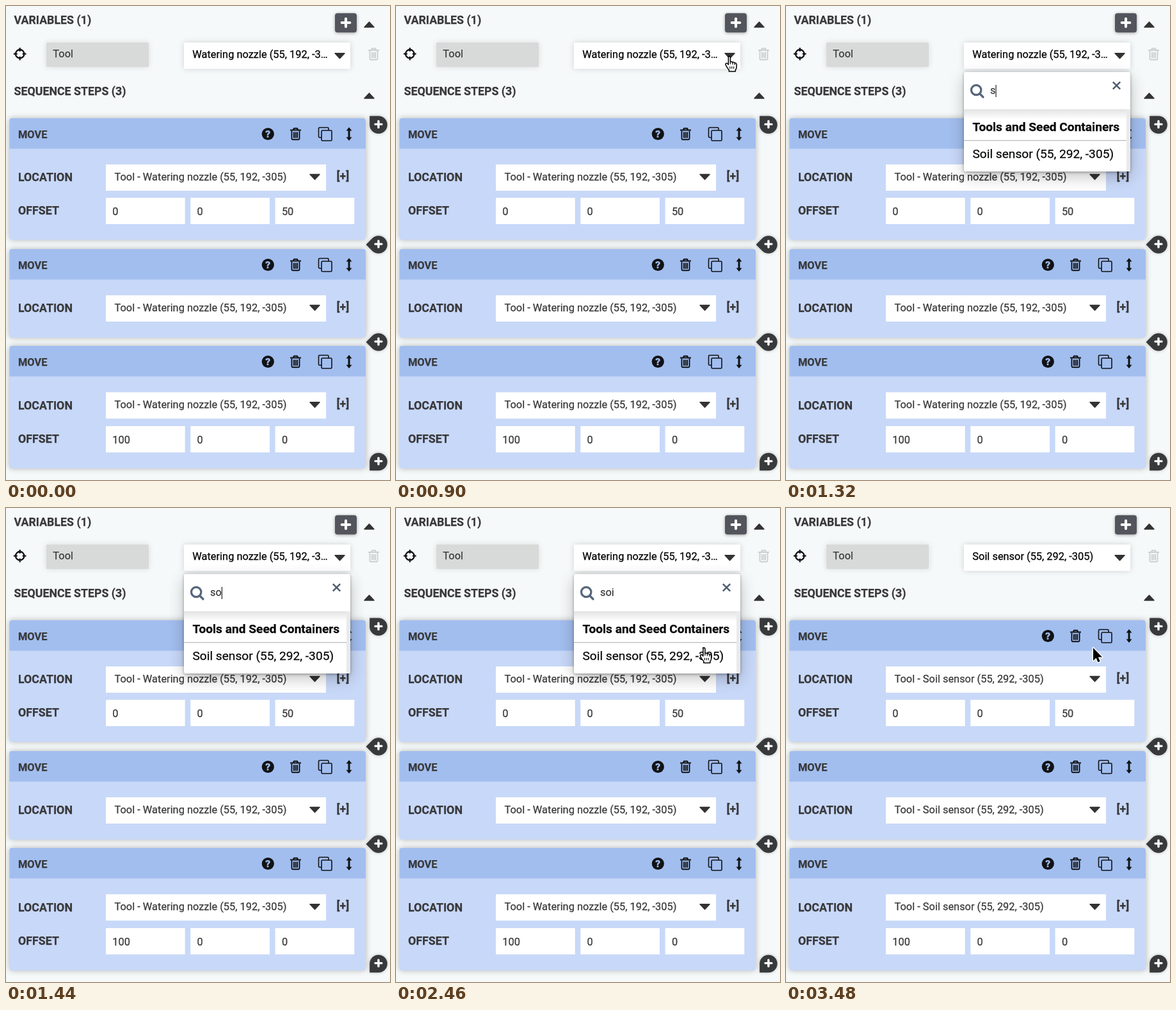
An HTML page with a canvas for the animation above (3.54 s loop, 600 px wide and 739 px high).

```html
<!DOCTYPE html>
<html lang="en">
<head>
<meta charset="utf-8">
<title>Sequence editor</title>
<style>
html, body { margin: 0; width: 100%; height: 100%; overflow: hidden; background: #f6f9f9; }
canvas { display: block; }
</style>
</head>
<body>
<canvas id="stage" width="600" height="739"></canvas>
<script>
const ctx = document.getElementById('stage').getContext('2d');
const LOOP = 3540, OPEN = 960, PICK = 2520;
const INK = '#38383a', BLACK = '#101214', BODY = '#c8d8f8', HEADER = '#a2beef';
const NOZZLE = 'Watering nozzle (55, 192, -305)', SENSOR = 'Soil sensor (55, 292, -305)';

const CURSORS = {
  hand: new Path2D('M5 1.2c1.5-1 3 0 3 1.6v5.6q1.6-.9 3 .4q1.8-.6 2.8 1q2-.4 2.5 1.6v4q0 2-1.5 3.6v2h-8.6v-2q-2.6-2.4-4.2-6.2q-1-2 .5-2.6q1.4-.3 2.3 1l.6.8V2.8q0-1.2.6-1.6z'),
  arrow: new Path2D('M0 0V17L3.9 13.4 6.4 19.2 9.1 18 6.7 12.4H12Z'),
  beam: new Path2D('M-4-10.5q4 0 4 2.5q0-2.5 4-2.5M0-8V8M-4 10.5q4 0 4-2.5q0 2.5 4 2.5M-2 3H2')
};

// A hairline outline gives the text its slightly heavy look.
function text(str, x, y, size = 16.4, color = INK, weight = 400) {
  ctx.font = `${weight} ${size}px Roboto, sans-serif`;
  ctx.fillStyle = ctx.strokeStyle = color;
  ctx.lineWidth = 0.25;
  ctx.fillText(str, x, y);
  ctx.strokeText(str, x, y);
}

function box(x, y, w, h, color, radius = 0, blur = 0, alpha = 0.2, dy = 0) {
  ctx.save();
  ctx.shadowColor = `rgba(0,0,0,${alpha})`;
  ctx.shadowBlur = blur;
  ctx.shadowOffsetY = dy;
  ctx.fillStyle = color;
  ctx.beginPath();
  ctx.roundRect(x, y, w, h, radius);
  ctx.fill();
  ctx.restore();
}

function stroke(path, color, width, cap = 'butt') {
  ctx.strokeStyle = color;
  ctx.lineWidth = width;
  ctx.lineCap = cap;
  ctx.lineJoin = 'round';
  ctx.stroke(path);
}

function at(x, y, draw, scale = 1) {
  ctx.save();
  ctx.translate(x, y);
  ctx.scale(scale, scale);
  draw();
  ctx.restore();
}

function caret(x, y, dir) {
  at(x, y, () => {
    const p = new Path2D(`M-7.5 ${-4 * dir}H7.5L0 ${4 * dir}Z`);
    ctx.fillStyle = '#333';
    ctx.fill(p);
    stroke(p, '#333', 1.5);
  });
}

function plus(x, y, r, width) {
  at(x, y, () => stroke(new Path2D(`M${-r} 0H${r}M0 ${-r}V${r}`), '#fff', width, 'round'));
}

function trash(x, y, color) {
  at(x, y, () => {
    stroke(new Path2D('M-8.5-6H8.5M-3.5-6.5L-2.5-8.8H2.5L3.5-6.5'), color, 2.1);
    stroke(new Path2D('M-6-5V7.2Q-6 8.7-4.5 8.7H4.5Q6 8.7 6 7.2V-5M-2.6-3V6.3M0-3V6.3M2.6-3V6.3'), color, 1.9);
  });
}

function headerIcons(y) {
  ctx.fillStyle = BLACK;
  ctx.beginPath();
  ctx.arc(409.3, y, 9.6, 0, 7);
  ctx.fill();
  ctx.textAlign = 'center';
  text('?', 409.3, y + 5.6, 15.5, HEADER, 900);
  ctx.textAlign = 'left';
  trash(452.5, y, BLACK);
  at(498.5, y, () => stroke(new Path2D('M-5.5 5.5H-8.5Q-10 5.5-10 4V-8.5Q-10-10-8.5-10H4Q5.5-10 5.5-8.5V-5.5M-4-5.5H9Q10.5-5.5 10.5-4V9Q10.5 10.5 9 10.5H-4Q-5.5 10.5-5.5 9V-4Q-5.5-5.5-4-5.5Z'), BLACK, 1.6));
  at(536, y, () => {
    ctx.fillStyle = BLACK;
    ctx.fill(new Path2D('M0-10.5L4.5-5H1.5V5H4.5L0 10.5-4.5 5H-1.5V-5H-4.5Z'));
  });
}

function card(y, height, locationY, tool, offsetY, offsets = []) {
  box(5.5, y, 556.5, height, BODY, 4, 10, 0.28);
  box(5.5, y, 556.5, 47.5, HEADER, [4, 4, 0, 0]);
  text('MOVE', 19, y + 31, 16.4, INK, 700);
  headerIcons(y + 24.5);
  text('LOCATION', 19, locationY + 26.3, 17.8, INK, 700);
  box(156, locationY, 344, 41, '#fff');
  text('Tool - ' + tool, 169.5, locationY + 25);
  caret(482.5, locationY + 19.5, 1);
  text('[+]', 516.5, locationY + 24, 17.8, INK, 700);
  if (offsets.length) text('OFFSET', 19, offsetY + 26, 17.8, INK, 700);
  offsets.forEach((value, i) => {
    const x = 156 + i * 132.3;
    box(x, offsetY, 123.7, 41, '#fff');
    text(value, x + 10.3, offsetY + 26.5);
  });
}

// A disc with one square corner, turned so the corner points at the insertion place.
function dropButton(y, angle) {
  at(582, y, () => {
    ctx.rotate(angle);
    box(-13.8, -13.8, 27.6, 27.6, '#38393b', [0, 13.8, 13.8, 13.8], 5, 0.25);
  });
  plus(582, y - 0.9, 5, 3.4);
}

function variables(tool) {
  text('VARIABLES (1)', 12.5, 28, 17.8, INK, 700);
  box(514, 11.3, 34, 30, '#52555c', 4, 5, 0.35, 1);
  plus(531, 26, 6.3, 4.1);
  caret(567.5, 29, -1);
  at(21.7, 74.7, () => {
    const ring = new Path2D('M0-9.8V-4M0 4V9.8M-9.8 0H-4M4 0H9.8');
    ring.moveTo(6.7, 0);
    ring.arc(0, 0, 6.7, 0, 7);
    stroke(ring, BLACK, 2.3);
  });
  box(63, 57, 160, 38, '#d8dad9', 1, 10, 0.12);
  text('Tool', 73.3, 80);
  box(278, 57, 260, 41, '#fff', 1, 10, 0.16);
  text(tool === NOZZLE ? 'Watering nozzle (55, 192, -3…' : tool, 291.3, 81, 16.4, '#000');
  caret(521.5, 77.7, 1);
  trash(574.5, 75, '#cdd0d0');
  text('SEQUENCE STEPS (3)', 12.5, 139, 17.8, INK, 700);
  caret(567.5, 140, -1);
}

function popover(query, caretOn) {
  const w = query ? 260 : 303, h = query ? 155 : 332, right = 278 + w;
  box(278, 103, w, h, '#fff', 3, 24, 0.24, 8);
  box(278, 103, w, h, '#fff', 3, 4, 0.35, 1);
  ctx.save();
  ctx.beginPath();
  ctx.roundRect(278, 103, w, h, 3);
  ctx.clip();
  const shade = ctx.createLinearGradient(0, 161, 0, 177);
  shade.addColorStop(0, 'rgba(0,0,0,.11)');
  shade.addColorStop(1, 'rgba(0,0,0,0)');
  ctx.fillStyle = shade;
  ctx.fillRect(278, 161, w, 16);
  box(right - 6, 161, 6, h - 58, '#e9eaeb');
  box(right - 6, 161, 6, query ? 0 : 69, '#76797f');

  let y = 195;
  const heading = 'Tools and Seed Containers';
  const items = query ? [heading, SENSOR] : ['Externally defined', 'Custom coordinates', heading,
    'Rotary tool (55, 92, -305)', NOZZLE, SENSOR, 'Seed bin (50, 600, -205)'];
  for (const item of items) {
    text(item, 291.5, y, 19.15, '#08090b', item === heading ? 700 : 400);
    if (item === heading) box(278, y + 14, w - 6, 1.2, '#b9bcbe');
    y += item === heading ? 42 : 41;
  }
  ctx.restore();

  const lens = new Path2D('M303 137L308 142');
  lens.moveTo(304.9, 131);
  lens.arc(297.2, 131, 7.7, 0, 7);
  stroke(lens, '#56657a', 3.2, 'round');
  text(query || 'Filter...', 319, 137, 16.4, query ? INK : '#9a9da0');
  if (query) stroke(new Path2D('M510.8 118.3L522.2 129.7M522.2 118.3L510.8 129.7'), '#4f5e73', 2.5);
  if (query && caretOn) box(319 + ctx.measureText(query).width, 123, 1.2, 19, '#222');
}

function cursor(type, x, y) {
  at(x, y, () => {
    const shape = CURSORS[type];
    if (type === 'beam') {
      stroke(shape, '#fff', 3.5);
      stroke(shape, '#000', 1.6);
      return;
    }
    if (type === 'hand') ctx.translate(-5.5, -1);
    const hand = type === 'hand';
    ctx.fillStyle = hand ? '#fff' : '#000';
    if (!hand) stroke(shape, '#fff', 2.4);
    ctx.fill(shape);
    if (hand) {
      stroke(shape, '#000', 1.3);
      stroke(new Path2D('M8 8.4V11.5M11 8.9V12M13.8 9.9V12.5M7.5 14.5V17.5M10 14.5V17.5M12.5 14.5V17.5'), '#000', 1);
    }
  }, type === 'beam' ? 1 : 1.17);
}

function glide(t, start, end, from, to) {
  const p = Math.min(1, Math.max(0, (t - start) / (end - start)));
  const e = p * p * (3 - 2 * p);
  return from.map((v, i) => v + (to[i] - v) * e);
}

function pointer(t) {
  if (t >= 480 && t < 1260) {
    const [x, y] = glide(t, 480, 800, [602, 128], [519.5, 78.5]);
    cursor(x < 538 && y < 98 ? 'hand' : 'arrow', x, y);
  } else if (t >= 2040) {
    const [x, y] = t < 2100
      ? glide(t, 2040, 2100, [510, 125], [502, 156])
      : glide(t, 2100, 2340, [502, 156], [480, 218]);
    cursor(t >= PICK ? 'arrow' : y < 161 ? 'beam' : 'hand', x, y);
  }
}

function draw(t) {
  const tool = t < PICK ? NOZZLE : SENSOR;
  const query = 'soi'.slice(0, [1260, 1380, 1560].filter(key => t >= key).length);
  ctx.fillStyle = '#f6f9f9';
  ctx.fillRect(0, 0, 600, 739);
  variables(tool);
  card(175, 189.5, 247, tool, 299, ['0', '0', '50']);
  card(379, 138, 451, tool);
  card(530, 191, 602.3, tool, 655, ['100', '0', '0']);
  dropButton(185.3, 0);
  dropButton(372, -Math.PI / 4);
  dropButton(524, -Math.PI / 4);
  dropButton(710.5, -Math.PI / 2);
  if (t >= OPEN && t < PICK) popover(query, t < 2060);
  pointer(t);
}

function tick() {
  draw(performance.now() % LOOP);
  requestAnimationFrame(tick);
}
tick();
</script>
</body>
</html>
```
